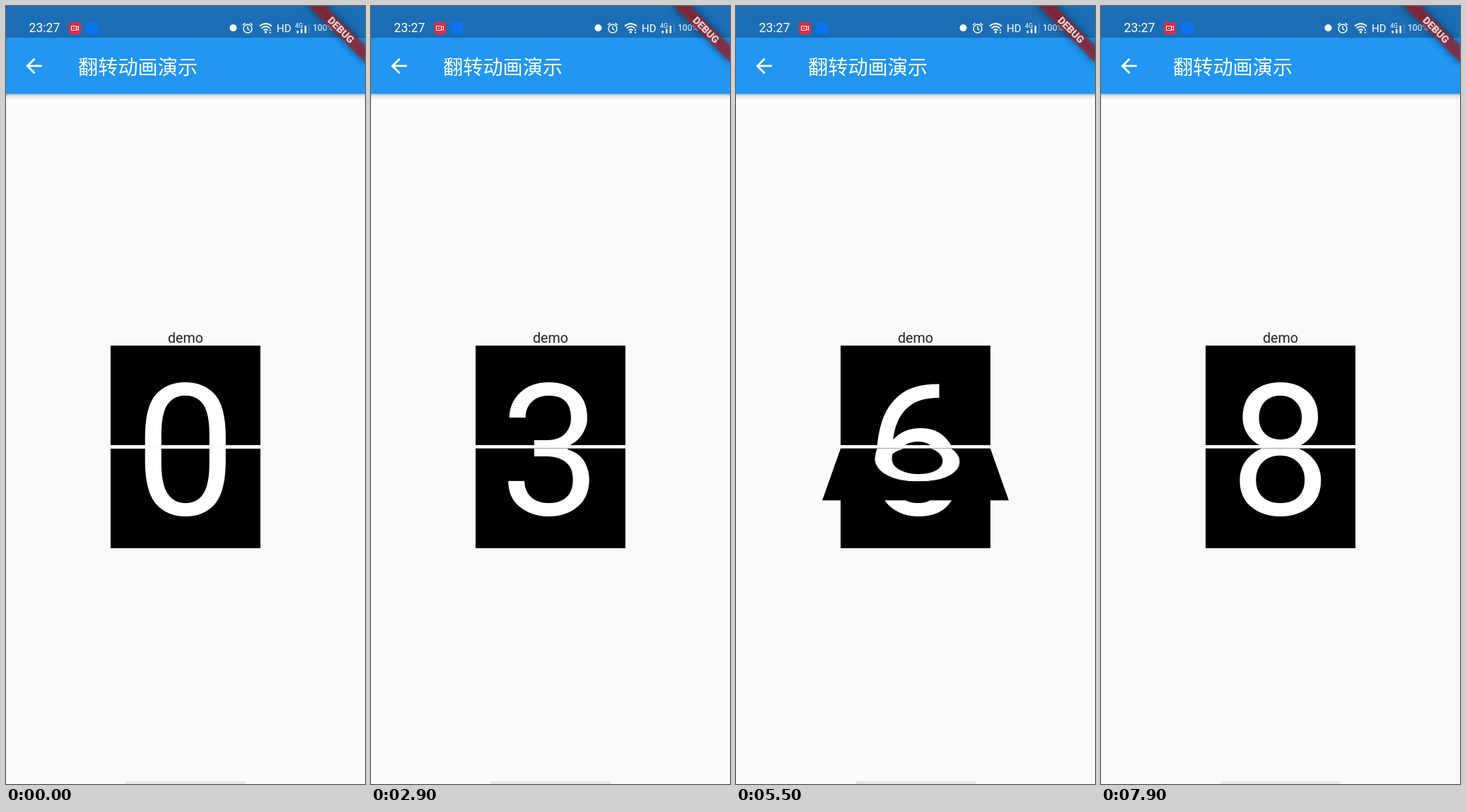
Write an HTML page that moves like this. It is 508 px wide and 1102 px high and loops after 8000 ms.

```html
<!DOCTYPE html>
<html lang="zh">
<head>
<meta charset="utf-8">
<title>翻转动画演示</title>
<style>
html, body { margin: 0; width: 100%; height: 100%; overflow: hidden; background: #fafafa; }
svg { position: absolute; left: 0; top: 0; font-family: Roboto, sans-serif; }
.half { left: 148px; width: 212px; height: 141px; background: #000; overflow: hidden; }
.half text { font-size: 254px; fill: #fff; text-anchor: middle; }
.top { top: 481px; transform-origin: 50% 100%; }
.bottom { top: 627px; transform-origin: 50% 0; }
</style>
</head>
<body>
<svg width="508" height="1102" viewBox="0 0 508 1102">
  <defs>
    <linearGradient id="shade" x2="0" y2="1">
      <stop stop-color="#000" stop-opacity=".26"/>
      <stop offset=".4" stop-color="#000" stop-opacity=".09"/>
      <stop offset="1" stop-color="#000" stop-opacity="0"/>
    </linearGradient>
    <filter id="blur" x="-30%" y="-150%" width="160%" height="400%"><feGaussianBlur stdDeviation="5.6"/></filter>
  </defs>
  <rect y="124" width="508" height="9" fill="url(#shade)"/>
  <rect width="508" height="124.5" fill="#2196f3"/>
  <rect width="508" height="45" fill="#1b6eb5"/>

  <!-- status bar -->
  <g fill="#fff">
    <text x="32.5" y="37" font-size="17.6">23:27</text>
    <rect x="89" y="23" width="17" height="17" rx="4" fill="#e22b43"/>
    <path d="M92.500 28.500h7v6h-7zM99.500 30.500l3-2v6l-3-2M95 31.500h2" fill="none" stroke="#fff"/>
    <rect x="113.500" y="23" width="17" height="17" rx="4" fill="#0c74ee"/>
    <circle cx="321.500" cy="31" r="5"/>
    <g fill="none" stroke="#fff" stroke-width="1.500">
      <circle cx="342" cy="32" r="6"/>
      <path d="M342 28.500v4l2.500 1.500M335 27l3.500-3M349 27l-3.500-3"/>
      <path d="M359 28.500q8.500-7 17 0M361.500 31.500q6-5 12 0M364.500 34.500q3-2.500 6 0" stroke-width="1.800"/>
    </g>
    <circle cx="367.500" cy="37" r="1.700"/>
    <path d="M373 33h2v2h-2zM373 36.500h2v2h-2z"/>
    <text x="383" y="37" font-size="15">HD</text>
    <text x="409" y="31" font-size="9">4G</text>
    <path d="M411.500 35h2.500v3.500h-2.500zM417 32.500h2.500v6h-2.500zM422.500 28h2.500v10.500h-2.500z"/>
    <path d="M428.500 25h1v13h-1z" opacity=".25"/>
    <text x="434" y="35" font-size="12.200">100%</text>
    <path d="M473 25l-6 7h4l-1 6 6-8h-4z"/>
  </g>

  <!-- app bar -->
  <path transform="translate(22.600 68) scale(1.411)" fill="#fff" d="M20 11H7.830l5.590-5.590L12 4l-8 8 8 8 1.410-1.410L7.830 13H20z"/>
  <text x="102" y="96.500" font-size="28.200" font-weight="500" fill="#fff" style="font-family:'Noto Sans CJK SC','Noto Sans CJK',sans-serif">翻转动画演示</text>
  <g transform="translate(508 0) rotate(45)">
    <rect x="-56.500" y="39.500" width="113" height="17" opacity=".5" filter="url(#blur)"/>
    <rect x="-56.500" y="39.500" width="113" height="17" fill="#b71c1c" fill-opacity=".627"/>
    <text y="53" font-size="14.400" font-weight="900" text-anchor="middle" fill="#fff" opacity=".8">DEBUG</text>
  </g>

  <text x="254" y="477" font-size="19.750" text-anchor="middle" fill="#222">demo</text>
  <rect id="seam" x="148" y="626" width="212" height="1" opacity=".35"/>
  <rect x="169" y="1098" width="170" height="8" rx="2" fill="#e4e4e4"/>
</svg>
<script>
const LOOP = 8000, STEP = 100, START = 40, QUARTER = 361, REST = 700;
const seam = document.getElementById('seam');

function makeHalf(side) {
  const baseline = side === 'top' ? 235.6 : 94;
  document.body.insertAdjacentHTML('beforeend',
    `<svg class="half ${side}"><text x="106" y="${baseline}"></text></svg>`);
  return document.body.lastElementChild;
}

const [top0, bottom0, topFlap, bottomFlap] = ['top', 'bottom', 'top', 'bottom'].map(makeHalf);

function setDigit(half, n) {
  half.firstChild.textContent = n;
}

// The perspective deepens in proportion to the angle.
function tilt(flap, n, angle, sign) {
  const shown = angle > 0 && angle < 90;
  flap.style.display = shown ? '' : 'none';
  if (!shown) return;
  setDigit(flap, n);
  flap.style.transform = `perspective(${473 * 90 / angle}px) rotateX(${sign * angle}deg)`;
}

function draw(time) {
  const t = Math.floor((time + 20) / STEP) * STEP % LOOP;
  const n = Math.floor(t / 1000), p = t % 1000;
  const turn = p < STEP ? 0 : p >= REST ? 2 : (p - START) / QUARTER;
  setDigit(top0, turn > 0 ? n + 1 : n);
  setDigit(bottom0, turn < 2 ? n : n + 1);
  tilt(topFlap, n, turn * 90, -1);
  tilt(bottomFlap, n + 1, (2 - turn) * 90, 1);
  seam.style.display = t >= 500 ? '' : 'none';
}

function tick() {
  draw(performance.now());
  requestAnimationFrame(tick);
}
tick();
</script>
</body>
</html>
```
